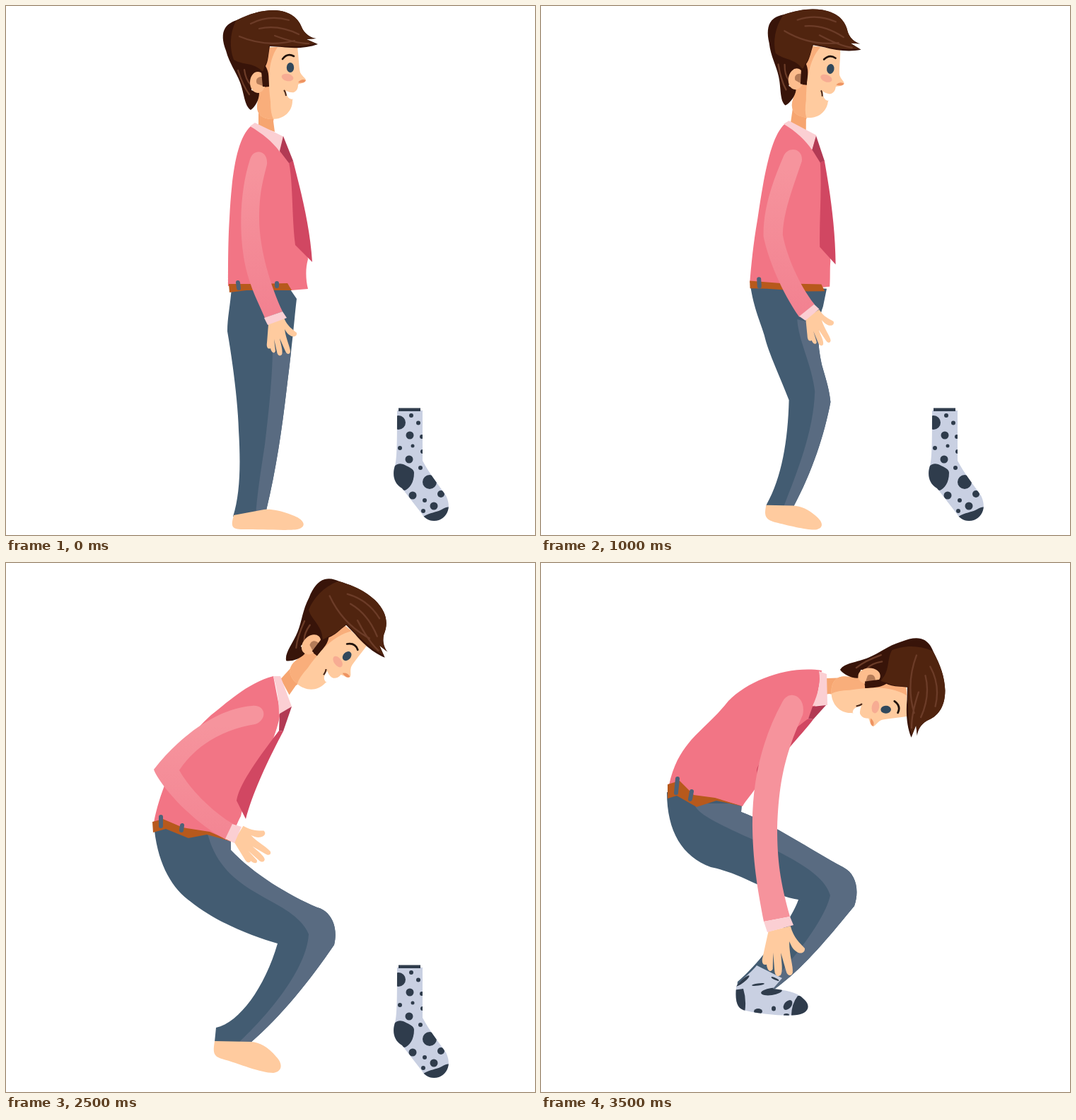
Animation of 748x748 px, one loop 4 s. Source, as an HTML page:

```html
<!DOCTYPE html>
<html lang="en">
<head>
<meta charset="utf-8">
<title>Putting on a sock</title>
<style>
  html, body { margin: 0; width: 100%; height: 100%; overflow: hidden; background: #fff; }
  svg { display: block; width: 100%; height: 100%; }
  .pose { visibility: hidden; animation: show 4s step-end infinite; }
  #sock { animation: lie 4s step-end infinite; }
  @keyframes show { 0% { visibility: visible; } 12.5%, 100% { visibility: hidden; } }
  @keyframes lie { 0% { visibility: visible; } 87.5%, 100% { visibility: hidden; } }
  .skin { fill: #ffcb9f; }
  .dark { fill: #2f3c4c; }
  .cloth { fill: #c9d0e2; }
  .shirt { fill: #f27585; }
  .collar, .cuff { fill: #fbcfd3; }
  .knot { fill: #b23a54; }
  .tie { fill: #d14762; }
  .belt { fill: #b7591c; }
  .loops { fill: none; stroke: #4d6278; stroke-width: 6; stroke-linecap: round; }
  .pants { fill: #435c72; }
  .shade { fill: #596b81; }
  .sleeve { fill: url(#sleeve); }
  .flat .sleeve { fill: #f6939c; }
</style>
</head>
<body>
<svg viewBox="0 0 748 748" xmlns="http://www.w3.org/2000/svg">
  <defs>
    <linearGradient id="sleeve" gradientUnits="userSpaceOnUse" x1="0" y1="230" x2="0" y2="440">
      <stop stop-color="#f6949d"/><stop offset="1" stop-color="#f28190"/>
    </linearGradient>
    <clipPath id="sockClip"><path id="sockShape" d="M553 572H589V643C598 660 610 675 622 692C630 708 625 722 612 727C600 730 592 725 588 718L560 682C548 675 546 662 550 650C553 640 553 610 553 572Z"/></clipPath>
    <clipPath id="wornClip"><path id="wornShape" d="M305 569L341 587L328 602C345 604 362 606 372 617C381 625 380 636 362 639C345 641 310 638 290 633C278 631 274 622 276 600C278 592 295 582 305 569Z"/></clipPath>

    <g id="head">
      <path fill="#f6a570" d="M357 145L380 152L378 163L380 178L357 170Z"/>
      <path class="skin" d="M364 58L412 58C414 72 414 86 416 94C419 100 424 102 424 105C423 109 417 109 413 111C413 117 411 120 407 122L405 134C405 149 393 160 377 160C362 160 355 153 355 142Z"/>
      <path fill="#f9ae7b" d="M364 60L384 58C369 80 371 110 374 135Q374 152 378 160C362 160 355 153 355 142Z"/>
      <path fill="#381409" d="M346 147C337 141 337 124 331 108C325 92 316 82 311 63C306 50 305 39 310 31C315 24 321 22 326 20C345 11 360 6 379 6C403 7 414 18 419 32C424 41 432 45 439 46L425 47L441 54C425 60 405 60 390 58L373 57C371 68 371 78 367 85C373 95 371 104 372 114L362 115L360 98L349 97L347 119L358 123C358 133 352 143 346 147Z"/>
      <path fill="#50240f" d="M325 21C345 11 360 6 379 6C403 7 414 18 419 32C424 41 430 45 437 46L424 47L438 53C420 58 400 57 372 56C371 68 370 78 366 84L363 93C350 79 335 84 322 76C316 60 316 40 325 21Z"/>
      <path fill="none" stroke="#6c3c28" stroke-width="2.200" stroke-linecap="round" d="M346 25Q372 12 400 20M330 43Q368 59 408 49M358 32Q385 26 414 40M328 91Q335 113 344 125M337 90Q339 105 346 111M380 42Q410 53 428 53"/>
      <ellipse cx="356" cy="108" rx="11" ry="15" fill="#fdbd8d"/>
      <path fill="#b47b58" d="M363 100C355 99 352 105 355 110L363 113Z"/>
      <path fill="#381409" d="M361 92L370 93L372 114L363 114Z"/>
      <ellipse cx="402" cy="87" rx="5.200" ry="7" fill="#31485c"/>
      <path d="M391 75Q398 66 407 71" fill="none" stroke="#20120c" stroke-width="2.600" stroke-linecap="round"/>
      <ellipse cx="398" cy="101" rx="8.500" ry="5" transform="rotate(12 398 101)" fill="#f7ac93"/>
      <path fill="#ee9362" d="M413 108Q418 102 424 105Q422 110 413 108Z"/>
      <path fill="#fff" d="M396 120Q404 124 412 121L405 132Q397 132 396 120Z"/>
      <path d="M393 119Q395 121 396 127" fill="none" stroke="#49291c" stroke-width="2"/>
    </g>
    <path id="hand" class="skin" d="M371 450L393 441C398 453 405 457 411 462C412 467 407 469 402 466C398 464 396 460 394 457C396 472 402 482 402 489C401 493 397 493 395 488L387 470C389 480 392 488 390 493C387 496 384 494 383 489L379 471L381 488C379 493 375 489 374 484C370 486 368 482 369 476Z"/>
  </defs>

  <g id="sock">
    <use href="#sockShape" class="cloth"/>
    <g class="dark" clip-path="url(#sockClip)" id="dots">
      <path d="M545 655C552 646 558 646 564 649C570 652 577 655 577 660C577 675 570 682 564 685L545 680ZM590 722C600 716 608 716 614 713C618 711 622 708 630 708V732H590Z"/>
    </g>
    <rect x="555" y="568.500" width="31" height="4.500" class="dark"/>
  </g>
  <g id="stage"></g>
</svg>
<script>
const stand = {
  head: '347 147 0 1', hand: '382 446 0 1',
  pants: 'M319 398C317 425 313 440 313 460C320 500 328 560 329 600C332 650 331 690 321 722L321 722L368 713C382 655 390 600 397 540C400 515 402 500 404 480C407 455 409 430 411 414L400 398Z',
  shade: 'M377 490C376 530 372 570 366 620C360 660 355 690 353 722L500 722L500 490Z',
  foot: 'M322 720C318 735 318 740 335 740C360 740 400 742 412 740C428 736 420 725 405 720C385 712 372 711 365 712Z',
  shirt: 'M346 170C326 188 319 240 316 300C314 330 314 370 314 396L400 396L403 402L427 400C424 388 423 372 427 358C420 300 412 250 393 190Z',
  belt: 'M315 393L330 393L350 393L398 392L404 402L385 402L360 402L340 402L316 405Z',
  loops: 'M328 391L329 399M383 392L383 396',
  collar: 'M345 170L352 165L393 185L387 206C377 192 362 180 345 170Z',
  tie: 'M406 219C415 255 430 310 433 362L409 338C404 300 406 250 400 221Z',
  knot: 'M392 184L406 219L400 222L387 205Z',
  sleeve: 'M345 217C331 260 328 320 339 370C346 400 358 422 366 441L391 432C375 398 358 345 358 300C358 262 364 245 369 224C371 204 350 200 345 217Z',
  cuff: 'M365 441L391 432L397 441L370 451Z'
};
const slouch = {
  head: '344 143 3 1.010', hand: '379 446 -4 1',
  pants: 'M303 402C309 425 316 440 317 455C316 475 327 515 341 559C342 620 341 670 328 721L328 721L368 714C380 660 390 615 401 566C400 550 400 540 398 520C398 485 392 450 397 425L404 404Z',
  shade: 'M373 485C375 510 379 530 383 552C376 610 360 670 354 722L500 722L500 485Z',
  foot: 'M328 719C325 735 326 741 340 742C360 744 395 745 405 742C417 738 412 730 400 723C390 717 378 713 366 713Z',
  shirt: 'M345 167C326 180 314 235 307 300C303 340 303 370 303 400L385 400L393 405L413 404C414 388 413 375 416 362C410 300 405 250 390 188Z',
  belt: 'M303 397L318 397L345 397L385 397L394 405L370 407L345 407L325 407L304 407Z',
  loops: 'M316 394L316 403M372 395L373 402',
  collar: 'M343 168L350 164L390 184L384 205C374 191 360 178 343 168Z',
  tie: 'M402 219C410 260 421 310 422 366L399 342C397 300 399 260 396 223Z',
  knot: 'M389 184L402 220L396 224L384 205Z',
  sleeve: 'M341 217C326 255 315 290 317 330C322 360 340 410 361 444L386 432C365 400 346 350 343 325C343 295 356 260 367 222C370 204 347 200 341 217Z',
  cuff: 'M361 443L385 432L391 438L369 455Z'
};
const bend = {
  head: '348 139 11.500 1', hand: '387 429 -14 .920',
  pants: 'M291 388C295 430 308 455 315 473C325 500 345 530 357 556C354 610 340 665 313 694L312 698L350 703C385 660 408 600 415 556C412 530 402 512 396 497C386 475 388 450 400 425L404 397Z',
  shade: 'M355 415C357 450 385 490 390 540C392 600 360 660 333 706L500 706L500 470Z',
  foot: 'M312 697C309 710 310 716 325 722C345 729 370 740 380 739C391 737 388 727 380 719C370 708 362 703 350 702Z',
  shirt: 'M345 166C326 185 318 230 306 300C298 335 294 360 290 386L370 394L390 394L405 392C406 375 405 367 405 360C400 300 405 250 388 185Z',
  belt: 'M290 383L305 385L340 389L404 391L406 402L380 401L345 398L315 395L290 394Z',
  loops: 'M303 381L304 392M328 385L329 395',
  collar: 'M343 166L351 161L389 182L383 203C374 189 360 176 343 166Z',
  tie: 'M400 218C406 255 413 310 413 365L391 340C391 300 396 260 394 220Z',
  knot: 'M389 183L400 218L394 220L383 202Z',
  sleeve: 'M344 210C328 245 313 285 313 323C320 355 340 400 368 437L387 415C365 390 348 355 341 322C342 290 356 255 370 218C372 198 350 196 344 210Z',
  cuff: 'M368 436L387 415L395 422L377 438Z'
};
const squat = {
  head: '397 139 42.500 1.050', hand: '329 383 -36 1.080',
  pants: 'M209 368C213 425 235 460 260 478C300 510 350 528 384 538C366 600 330 650 297 657L295 677L346 678C390 640 430 590 464 540C470 515 460 492 440 487C400 470 350 440 318 406L318 390Z',
  shade: 'M284 378C305 475 405 470 428 525C425 575 370 640 327 680L500 680L500 378Z',
  foot: 'M295 676C293 690 292 697 305 701C330 708 360 721 378 721C392 719 391 707 382 698C370 684 360 678 346 677Z',
  shirt: 'M378 160C340 170 310 200 290 215C250 250 220 310 209 367L250 376L288 383L318 394C322 380 327 367 332 358C342 315 380 262 388 212Z',
  belt: 'M207 366L222 362L250 374L288 380L320 394L284 384L258 389L226 376L208 381Z',
  loops: 'M219 359L219 372M249 371L248 378',
  collar: 'M378 160L388 160L404 203L386 214C386 195 383 177 378 160Z',
  tie: 'M392 238C375 270 350 320 339 362L326 336C330 310 365 265 386 237Z',
  knot: 'M404 203L392 238L386 237L387 213Z',
  sleeve: 'M348 202C300 205 245 245 209 292C215 310 260 365 311 391L321 369C290 350 260 320 245 293C270 255 310 235 352 228C370 222 368 200 348 202Z',
  cuff: 'M310 390L320 369L333 373L323 396Z'
};
const reach = {
  head: '423 152 88 1.045', hand: '455 490 -11.500 1.330', flat: true,
  pants: 'M178 324C178 380 200 415 240 430C290 440 325 470 364 476C352 510 305 570 278 592L276 609L328 604C370 575 410 525 443 485C450 465 447 440 427 430C380 405 330 370 283 352L284 340Z',
  shade: 'M217 340C220 372 395 412 409 470C400 510 345 575 310 609L500 609L500 340Z',
  foot: 'M276 608C274 622 278 631 290 633C310 638 345 641 362 639C380 636 381 625 372 617C362 606 345 604 328 603Z',
  shirt: 'M397 152C350 145 295 165 265 195C230 240 195 250 181 314L215 335L250 334L285 344C290 335 300 325 306 314C325 270 372 240 388 202Z',
  belt: 'M179 313L196 308L216 328L246 332L285 344L248 336L220 345L192 329L179 333Z',
  loops: 'M193 305L191 325M213 323L211 334',
  collar: 'M393 153L404 157L405 201L384 202C392 185 396 168 393 153Z',
  tie: 'M385 221C372 240 325 285 309 321L305 293C308 275 345 245 378 220Z',
  knot: 'M403 201L385 221L378 220L384 203Z',
  sleeve: 'M327 210C325 265 340 330 365 387C385 427 407 462 432 490L461 470C435 435 404 390 382 340C370 310 362 270 360 210C360 190 328 188 327 210Z',
  cuff: 'M432 489L461 470L469 478L442 501Z'
};
const dress = {
  ...reach, worn: true, hand: '337 518 8 1.360',
  sleeve: 'M341 197C312 250 298 310 299 375C300 430 308 470 315 507L352 500C338 450 334 420 334 375C336 310 345 270 370 215C376 190 352 176 341 197Z',
  cuff: 'M315 507L352 500L357 512L320 522Z'
};

// Blend two poses whose paths share the same commands.
const number = /-?\d*\.?\d+/g;
function mix(a, b, t) {
  const out = {};
  for (const key in a) {
    const to = b[key].match(number);
    let i = 0;
    out[key] = a[key].replace(number, n => (+n + (to[i++] - n) * t).toFixed(2));
  }
  return out;
}
const lean = mix(slouch, bend, .6);
const crouch = mix(bend, squat, .52);
crouch.fit = 'translate(600 374) scale(1.028) translate(-600 -374)';

function place(id, spec, cx, cy) {
  const [x, y, r, s] = spec.split(' ');
  return `<use href="#${id}" transform="translate(${x} ${y}) rotate(${r}) scale(${s}) translate(${-cx} ${-cy})"/>`;
}
const dot = (x, y, r) => `<circle cx="${x}" cy="${y}" r="${r}"/>`;
const spot = (x, y, rx, ry, a) => `<ellipse rx="${rx}" ry="${ry}" transform="translate(${x} ${y}) rotate(${a})"/>`;

const wornSock = `<use href="#wornShape" class="cloth"/><g class="dark" clip-path="url(#wornClip)">
  <path d="M270 604L286 602Q291 618 288 636H270ZM363 612Q353 625 354 645H385V612Z"/>
  ${spot(326, 606, 15, 5, -8)}${spot(285, 591, 12, 2.5, -38)}${spot(307, 596, 9, 1.6, -8)}${spot(349, 625, 8, 5, -50)}
  ${spot(307, 634, 6, 4, 0)}${spot(329, 630, 3, 3.5, 0)}${spot(347, 639, 4, 2, 0)}${spot(331, 588, 6, 1.5, 25)}</g>`;

function draw(p, i) {
  const part = key => `<path class="${key}" d="${p[key]}"/>`;
  return `<g class="pose${p.flat ? ' flat' : ''}" style="animation-delay:${i * 500 - 4000}ms">
    <clipPath id="legs${i}"><path d="${p.pants}"/></clipPath>
    <g transform="${p.fit || 'scale(1)'}">
    ${place('head', p.head, 347, 147)}${part('pants')}
    <g clip-path="url(#legs${i})">${part('shade')}</g>
    ${p.worn ? wornSock : `<path class="skin" d="${p.foot}"/>`}
    ${['shirt', 'belt', 'loops', 'collar', 'tie', 'knot'].map(part).join('')}
    ${place('hand', p.hand, 382, 446)}${part('sleeve')}${part('cuff')}</g></g>`;
}

document.getElementById('stage').innerHTML =
  [stand, slouch, lean, bend, crouch, squat, reach, dress].map(draw).join('');
document.getElementById('dots').innerHTML += [
  [555, 589, 10], [573, 579, 3], [583, 589.5, 3], [571, 607, 5.5], [557, 625, 3], [575, 622, 2.5],
  [588, 609, 3], [589, 630, 3], [570, 641, 5.5], [586, 653, 3], [599, 673, 10], [575, 692, 5.5],
  [615, 690, 5], [605, 707, 5.5], [592, 699, 3], [590, 714, 3]
].map(d => dot(...d)).join('');
</script>
</body>
</html>
```
